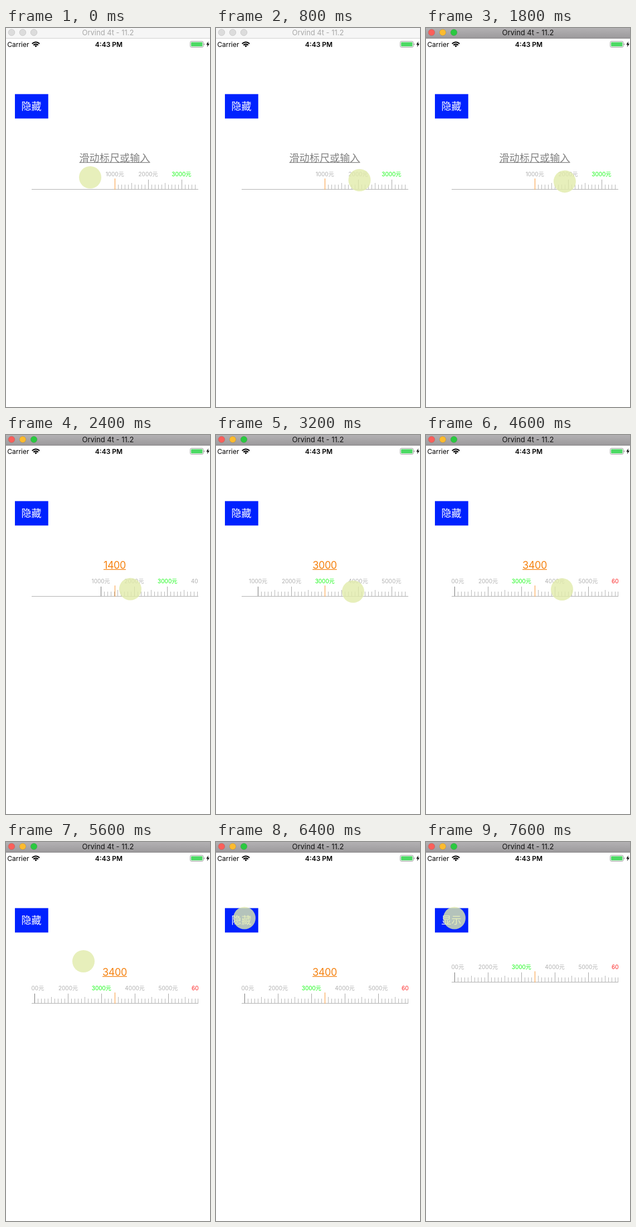
An HTML page that plays this animation: 366 by 680 pixels, repeating every 8000 ms.

```html
<!DOCTYPE html>
<html lang="zh">
<head>
<meta charset="utf-8">
<title>Ruler input</title>
<style>
  html, body { margin: 0; width: 100%; height: 100%; overflow: hidden; background: #fff; }
  svg { display: block; width: 366px; height: 680px; }
  text { font-family: Inter, "Noto Sans CJK SC", "Noto Sans CJK", "Noto Sans", sans-serif; }
  .mid { text-anchor: middle; }
  .crisp line { shape-rendering: crispEdges; }
  .label { font-size: 10px; fill: #b0b0b0; text-anchor: middle; }
  #title { font-size: 13px; }
  #button { font-size: 18px; font-weight: 300; fill: #fff; }
  #value { font-size: 18px; fill: #f58210; letter-spacing: -0.4px; }
  #underline { stroke: #f58210; }
  .empty #value { fill: #808080; font-weight: 300; letter-spacing: 0.15px; }
  .empty #underline { stroke: #808080; }
</style>
</head>
<body>
<svg viewBox="0 0 366 680">
  <defs>
    <linearGradient id="chrome" x1="0" y1="0" x2="0" y2="1">
      <stop offset="0" stop-color="#b3b1b3"/>
      <stop offset="1" stop-color="#9c9a9c"/>
    </linearGradient>
    <clipPath id="rulerClip"><rect x="46" y="250" width="299" height="42"/></clipPath>
  </defs>

  <rect id="bar" width="366" height="18"/>
  <rect id="barEdge" y="18" width="366" height="1"/>
  <g id="dots"></g>
  <text id="title" class="mid" x="183" y="13">Orvind 4t - 11.2</text>

  <text x="2.2" y="33.5" font-size="12">Carrier</text>
  <g fill="none" stroke="#000" stroke-width="2">
    <path d="M46.8 28.2Q53.5 22.2 60.2 28.2"/>
    <path d="M49.2 30.8Q53.5 27 57.8 30.8"/>
    <path d="M51.2 31.8Q53.5 30 55.8 31.8L53.5 34.4Z" fill="#000" stroke="none"/>
  </g>
  <text class="mid" x="184.5" y="33.5" font-size="12" font-weight="600">4:43 PM</text>
  <rect x="330.5" y="24" width="23.5" height="10.5" rx="2.2" fill="none" stroke="#999"/>
  <rect x="332" y="25.5" width="20.5" height="7.5" rx="1" fill="#4cd964"/>
  <path d="M355.2 27.3Q357.2 29.3 355.2 31.3Z" fill="#777"/>
  <path d="M363.3 24L359.3 29.8H361.8L360.8 34.2L365 28.3H362.4Z"/>

  <rect x="16" y="118.6" width="59.8" height="43.8" fill="#0022ff"/>
  <text id="button" class="mid" x="45.6" y="147.2"></text>

  <g id="field">
    <text id="value" class="mid" x="195" y="239.8"></text>
    <line id="underline" y1="241.3" y2="241.3" stroke-width="1.2"/>
  </g>

  <g id="ruler" class="crisp">
    <g clip-path="url(#rulerClip)"><g id="scale"></g></g>
    <line x1="46" x2="345" y1="289.5" y2="289.5" stroke="#b0b0b0"/>
    <line x1="195.5" x2="195.5" y1="270" y2="290" stroke="#f9993a"/>
  </g>

  <circle id="touch" r="20" fill="#e2ecaa" fill-opacity=".8"/>
</svg>
<script>
const LOOP = 8000, TICK = 200, ACTIVE_AT = 1400, HIDE_AT = 7200;
const CENTER = 195.5, UNIT = 59.8; // pixels per 1000
const labelColors = { 3000: "#14fa14", 6000: "#fc2020" };

// Touch path: time, x, y
const path = [
  [0, 151, 268], [800, 257.5, 273], [1600, 257.5, 275], [2400, 223, 276.5],
  [2800, 172, 277], [3200, 246, 281], [3600, 280, 275], [4000, 280, 275],
  [4600, 244, 277], [5000, 244, 277], [5600, 139, 214], [6200, 51, 136.5]
];

// Ruler drags: start, end, amount
const drags = [[1800, 2400, 420], [2400, 3200, 1580], [4200, 4600, 400]];

const $ = id => document.getElementById(id);
const progress = (t, from, to) => Math.min(1, Math.max(0, (t - from) / (to - from)));
const smooth = p => p * p * (3 - 2 * p);

function set(el, attrs) {
  for (const key in attrs) el.setAttribute(key, attrs[key]);
  return el;
}

function add(parent, tag, attrs) {
  const el = set(document.createElementNS("http://www.w3.org/2000/svg", tag), attrs);
  return parent.appendChild(el);
}

function buildScale() {
  for (let i = 0; i <= 60; i++) {
    const x = CENTER + i * UNIT / 10;
    const major = i % 10 === 0;
    const top = major ? 272 : i % 5 === 0 ? 278 : 281;
    const stroke = i === 0 ? "#777" : major ? "#a8a8a8" : "#b8b8b8";
    add($("scale"), "line", { x1: x, x2: x, y1: top, y2: 290, stroke });
    if (!major) continue;
    const amount = 1000 + i * 100;
    const label = add($("scale"), "text", { class: "label", x: x - 0.3, y: 266.4 });
    label.textContent = amount + "元";
    label.style.fill = labelColors[amount] || "";
  }
}

function touchAt(t) {
  const next = path.findIndex(point => point[0] > t);
  if (next < 0) return path.at(-1).slice(1);
  const [t0, x0, y0] = path[next - 1], [t1, x1, y1] = path[next];
  const p = progress(t, t0, t1);
  return [x0 + (x1 - x0) * p, y0 + (y1 - y0) * p];
}

function amountAt(t) {
  return drags.reduce((sum, [from, to, by]) => sum + by * smooth(progress(t, from, to)), 0);
}

function showChrome(active) {
  set($("bar"), { fill: active ? "url(#chrome)" : "#f6f6f6" });
  set($("barEdge"), { fill: active ? "#858385" : "#d0d0d0" });
  set($("title"), { fill: active ? "#111" : "#a8a8a8" });
  const fills = active ? ["#fc5f5a", "#fdbb2f", "#2ac940"] : Array(3).fill("#dcdcdc");
  [...$("dots").children].forEach((dot, i) => set(dot, { fill: fills[i] }));
}

function showValue(amount) {
  const empty = amount === 0;
  const value = $("value");
  set($("field"), { class: empty ? "empty" : "" });
  value.textContent = empty ? "滑动标尺或输入" : 1000 + Math.round(amount / 100) * 100;
  const half = value.getComputedTextLength() / 2;
  set($("underline"), { x1: 195 - half, x2: 195 + half });
}

function draw(t) {
  const [cx, cy] = touchAt(t);
  const amount = amountAt(t);
  const hidden = t >= HIDE_AT;
  showChrome(t >= ACTIVE_AT);
  showValue(amount);
  $("button").textContent = hidden ? "显示" : "隐藏";
  set($("field"), { visibility: hidden ? "hidden" : "visible" });
  set($("ruler"), { transform: `translate(0 ${hidden ? -38 : 0})` });
  set($("scale"), { transform: `translate(${-amount / 1000 * UNIT} 0)` });
  set($("touch"), { cx, cy });
}

function frame() {
  const t = performance.now() % LOOP;
  draw(Math.floor(t / TICK) * TICK);
  requestAnimationFrame(frame);
}

for (const cx of [10, 30, 50]) {
  add($("dots"), "circle", { cx, cy: 8, r: 5.8, stroke: "#000", "stroke-opacity": 0.12 });
}
buildScale();
frame();
</script>
</body>
</html>
```
